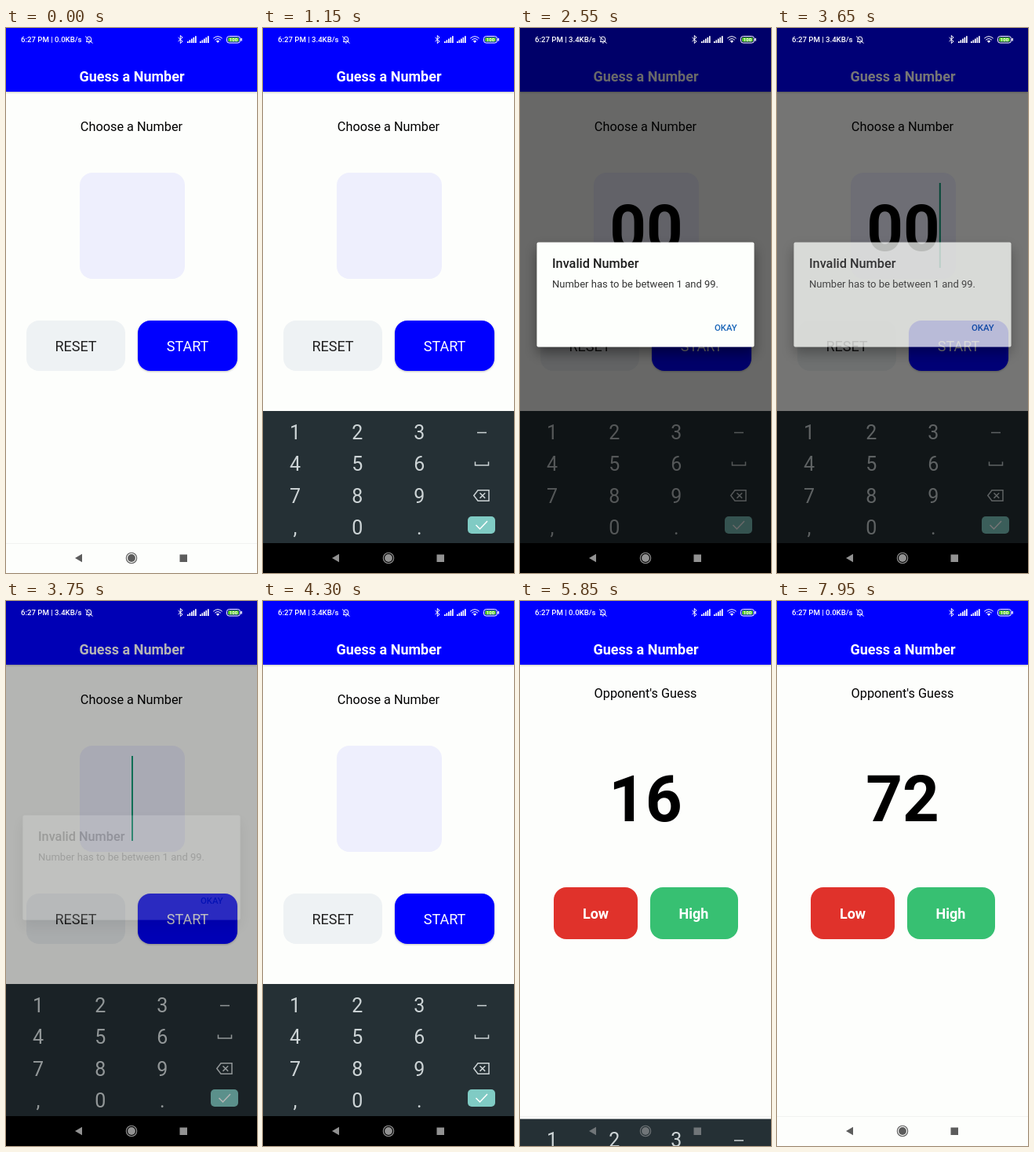
Write an HTML page that moves like this. It is 320 by 693 pixels and loops after 8 s.

```html
<!DOCTYPE html>
<html lang="en">
<head>
<meta charset="utf-8">
<title>Guess a Number</title>
<style>
  html, body { margin: 0; width: 100%; height: 100%; overflow: hidden; background: #fdfefc; }
  svg { display: block; width: 100%; height: 100%; font-family: Roboto, sans-serif; }
  .mid { text-anchor: middle; }
  .title { font-size: 18px; font-weight: 700; fill: #fff; }
  .label { font-size: 16.3px; }
  .btn { font-size: 18px; }
  .big { font-size: 81.4px; font-weight: 700; }
  .key { font-size: 25px; fill: #cdd4d6; }
  .line { fill: none; stroke: #cdd4d6; stroke-width: 1.5; }
  .thin { fill: none; stroke: #fff; stroke-width: 1; }
</style>
</head>
<body>
<svg viewBox="0 0 320 693" preserveAspectRatio="none">
  <defs>
    <filter id="soft" x="-20%" y="-30%" width="140%" height="170%"><feDropShadow dx="0" dy="1" stdDeviation="1.2" flood-opacity=".25"/></filter>
    <filter id="deep" x="-20%" y="-30%" width="140%" height="180%"><feDropShadow dx="0" dy="8" stdDeviation="8" flood-opacity=".4"/></filter>
  </defs>
  <rect width="320" height="693" fill="#fdfefc"/>
  <path d="M0 655.5H320" stroke="#f1f2f1"/>
  <rect width="320" height="81" fill="#00f" filter="url(#soft)"/>
  <text class="mid title" x="160.5" y="68">Guess a Number</text>

  <g id="choose">
    <text class="mid label" x="160" y="131">Choose a Number</text>
    <rect x="94" y="184" width="134" height="135" rx="16" fill="#eeeffd"/>
    <text id="entry" class="mid big" x="161" y="283"></text>
    <rect id="caret" y="197" width="2" height="108" fill="#0a9b78"/>
    <rect x="26" y="372" width="126" height="64" rx="16" fill="#eef2f4"/>
    <text class="mid btn" x="89" y="411.3" fill="#222">RESET</text>
    <g id="start">
      <rect x="168" y="372" width="127" height="64" rx="16" fill="#00f" filter="url(#soft)"/>
      <text class="mid btn" x="231.5" y="411.3" fill="#fff">START</text>
    </g>
  </g>

  <g id="game">
    <text class="mid label" x="160" y="123">Opponent's Guess</text>
    <text id="guess" class="mid big" x="160" y="280"></text>
    <rect x="43" y="364" width="107" height="66" rx="16" fill="#e0322b"/>
    <text class="mid title" x="96.5" y="404">Low</text>
    <g id="high">
      <rect x="166" y="364" width="112" height="66" rx="16" fill="#37c072"/>
      <text class="mid title" x="221.5" y="404">High</text>
    </g>
  </g>

  <g id="keyboard">
    <rect y="487" width="320" height="168" fill="#253035"/>
    <rect y="655" width="320" height="38"/>
    <rect id="press" x="81" width="79" height="40" rx="4" fill="#465258"/>
    <g id="keys"></g>
    <path class="line" d="M273 514.5H285M270.5 551.5V556H287.5V551.5"/>
    <path class="line" d="M274 587.7H288V601.3H274L268.8 594.5ZM276.5 591.2L283.2 597.9M283.2 591.2L276.5 597.9"/>
    <rect x="261" y="621" width="35" height="22" rx="5" fill="#80cbc4"/>
    <path class="line" d="M271.5 632L276.5 637L286 627" style="stroke:#fff"/>
  </g>

  <rect id="dim" width="320" height="655"/>
  <g id="dialog">
    <rect x="21.5" y="272.5" width="277" height="133" rx="2" fill="#fdfffc" filter="url(#deep)"/>
    <text x="41" y="305" font-size="16.3" font-weight="500" fill="#1c1c1c">Invalid Number</text>
    <text x="41" y="329.5" font-size="13.03" fill="#333">Number has to be between 1 and 99.</text>
    <text x="248" y="385" font-size="11.4" font-weight="500" fill="#1a66b8">OKAY</text>
  </g>

  <text id="status" x="19" y="18" font-size="9.6" font-weight="500" fill="#fff"></text>
  <path class="thin" d="M102 17.5H109M103 17V14Q103 11 105.8 11T108.6 14V17M104.8 19H106.8M101 10.5L110.5 19.5"/>
  <path class="thin" d="M219.5 12L225 17L222.3 19.5V9.5L225 12L219.5 17"/>
  <g id="signals" fill="#fff"></g>
  <path class="thin" d="M264.3 13.2Q270 8.2 275.7 13.2M266.2 15.2Q270 12 273.8 15.2" stroke-width="1.4"/>
  <path d="M267.8 16.5Q270 14.8 272.2 16.5L270 19Z" fill="#fff"/>
  <rect x="281.5" y="10.5" width="17" height="8.5" rx="3" fill="none" stroke="#fff"/>
  <rect x="283" y="12" width="14" height="5.5" rx="1.5" fill="#56c926"/>
  <rect x="299.5" y="13" width="1.5" height="3.5" fill="#fff"/>
  <text class="mid" x="290" y="17" font-size="6" font-weight="700" fill="#fff">100</text>

  <g id="nav">
    <path d="M88 674L97 668.7V679.3Z"/>
    <circle cx="160" cy="674" r="4.9"/>
    <circle cx="160" cy="674" r="6.7" fill="none" stroke="inherit" stroke-width="1.1"/>
    <rect x="221.5" y="669.5" width="9.5" height="9.5"/>
  </g>
</svg>
<script>
const $ = id => document.getElementById(id);
const set = (id, attrs) => { for (const k in attrs) $(id).setAttribute(k, attrs[k]); };
const ramp = (t, from, length) => Math.min(1, Math.max(0, (t - from) / length));
const show = (id, on) => set(id, { opacity: +on });

$('keys').innerHTML = [...'123456789,0.'].map((c, i) =>
  `<text class="mid key" x="${41 + i % 3 * 79.2}" y="${522.7 + Math.floor(i / 3) * 40.5}">${c}</text>`).join('');
$('signals').innerHTML = [231, 247].map(x => [0, 1, 2, 3, 4].map(i =>
  `<rect x="${x + i * 2.5}" y="${17 - i * 1.7}" width="1.7" height="${2 + i * 1.7}"/>`).join('')).join('');

const LOOP = 8000, FOCUS = 450, CLEARED = 3700, GAME = 5550;
const inputs = [[1250, '0', 615], [1600, '00', 615], [CLEARED, ''], [4550, '5', 534], [4900, '55', 534]];

// Touch feedback: quick fade to 20 %, slower recovery
const touch = (t, at) => 1 - .8 * (ramp(t, at - 50, 150) - ramp(t, at + 150, 250));

function draw(t) {
  const last = inputs.filter(e => t >= e[0]).pop() || [FOCUS, ''];
  const [when, text, keyY] = last;
  const inGame = t >= GAME;
  show('choose', !inGame);
  show('game', inGame);

  $('entry').textContent = text;
  const blinkFrom = when === CLEARED ? 3650 : when;
  const covered = t >= 2350 && t < 3650;
  const caretOn = t >= FOCUS && !covered && (t - blinkFrom) % 1000 < 500;
  set('caret', { x: 160 + text.length * 23.4, opacity: +caretOn });
  set('press', { y: keyY || 0, opacity: +(!!keyY && t - when < 120) });
  set('start', { opacity: Math.min(touch(t, 2100), touch(t, 5350)) });

  $('guess').textContent = t < 6900 ? '16' : '72';
  set('high', { opacity: touch(t, 6800) });

  const rise = 1 - (1 - ramp(t, 550, 300)) ** 2;
  const fall = ramp(t, 5600, 275) ** 2;
  set('keyboard', { transform: `translate(0 ${206 * (1 - rise + fall)})` });
  const navColor = rise > .2 && fall < .95 ? (fall > 0 ? '#707578' : '#929292') : '#5c5c5c';
  set('nav', { fill: navColor, stroke: 'none' });
  $('nav').children[2].setAttribute('stroke', navColor);

  const open = ramp(t, 2350, 200), closing = t >= 3650;
  set('dialog', { opacity: closing ? .74 * (1 - ramp(t, 3650, 130)) : open });
  set('dim', { opacity: closing ? .54 * (1 - ramp(t, 3650, 220)) : .59 * open });

  $('status').textContent = `6:27 PM | ${t >= 800 && t < 5600 ? '3.4' : '0.0'}KB/s`;
}

const origin = performance.now();
function frame() {
  draw((performance.now() - origin) % LOOP);
  requestAnimationFrame(frame);
}
frame();
</script>
</body>
</html>
```
